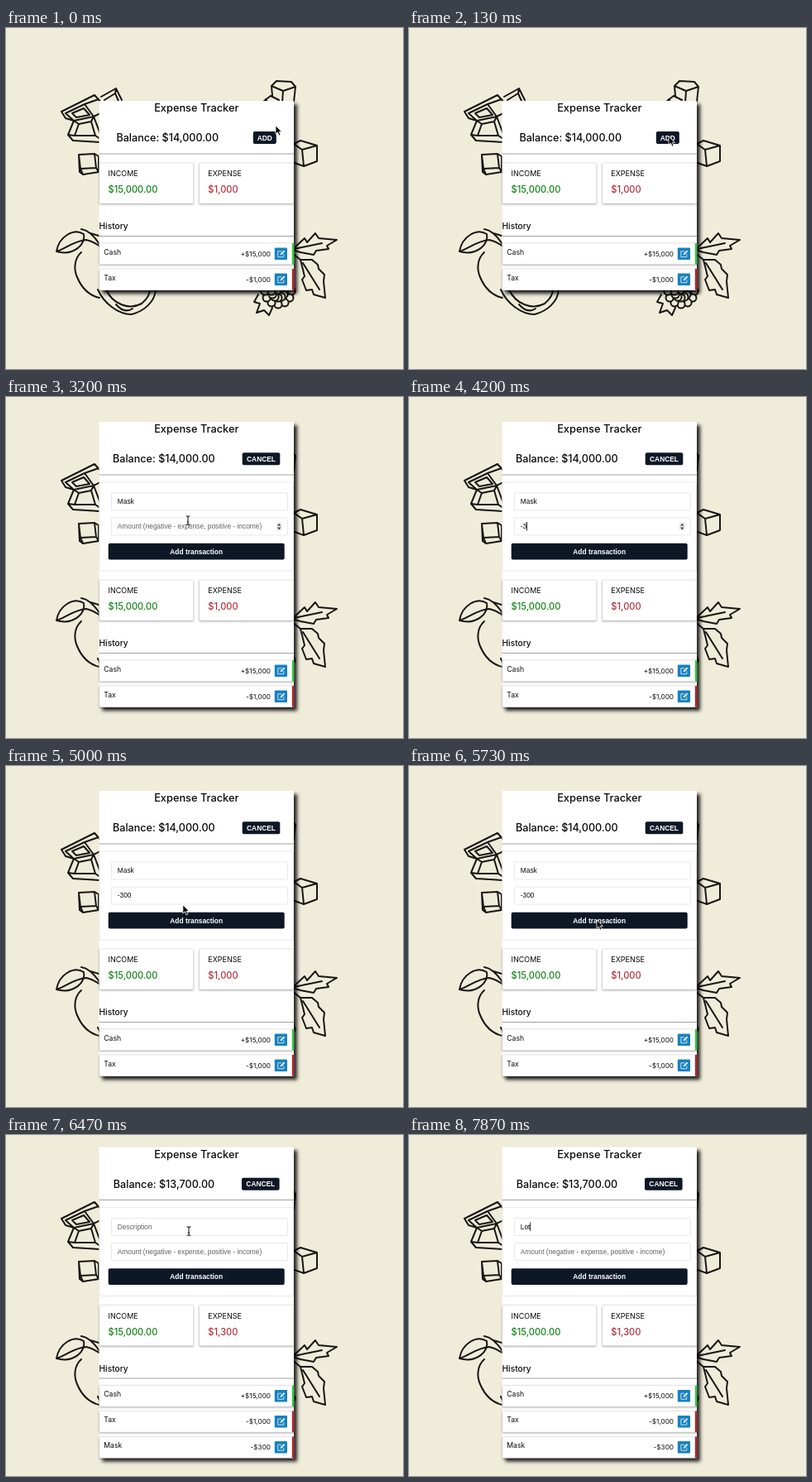
These frames come from a looping animation (480 by 412 pixels, 8 s). An HTML page:

```html
<!DOCTYPE html>
<html lang="en">
<head>
<meta charset="utf-8">
<title>Expense Tracker</title>
<style>
  html, body { margin: 0; width: 100%; height: 100%; overflow: hidden; background: #f0ecda; }
  svg { display: block; width: 480px; height: 412px; }
  text { font-family: Inter, "Open Sans", sans-serif; fill: #0a0a0a; white-space: pre; }
  .form { font-family: "Liberation Sans", Arial, sans-serif; font-size: 8.35px; }
  .hint { fill: #626262; }
  .bold { font-weight: 700; font-size: 8.4px; fill: #fff; text-anchor: middle; }
  .doodle { fill: none; stroke: #171614; stroke-width: 2; stroke-linecap: round; stroke-linejoin: round; }
  .card { fill: #fff; filter: drop-shadow(4.6px 4.6px 1.9px rgba(0, 0, 0, .85)); }
  .panel { fill: #fff; stroke: #d4d4d4; stroke-width: .5; filter: drop-shadow(0 1px .8px rgba(0, 0, 0, .32)); }
  .box { fill: #fff; stroke: #e4e4e6; stroke-width: .8; }
  .rule { stroke: #a2a2a2; stroke-width: 1.1; }
  .dark { fill: #0d1726; }
</style>
</head>
<body>
<svg viewBox="0 0 480 412">
  <rect width="480" height="412" fill="#f0ecda"/>
  <g class="doodle">
    <!-- chocolate -->
    <path d="M67 101L93 88 107 81 115 90M67 101L72 109 82 112M72 103L95 92 106 107 82 112ZM80 103L94 97 101 105 85 108Z
      M82 112L106 107 114 128M82 112L75 129 81 136 114 138M88 116L103 113 108 130 83 130ZM82 112L88 116M106 107L103 113
      M75 129L83 130M108 130L114 134M95 92L112 86M106 107L114 103
      M115 83L133 73 140 87M119 87L132 79 136 88M133 73L132 79"/>
    <path d="M88 153L107 152 109 169 90 170ZM107 152L112 155 112 174 93 177 89 174 88 153M109 169L112 174M90 170L93 177"/>
    <!-- sugar cubes -->
    <path d="M321 70L327 64 345 65 350 71 335 76ZM335 76L334 90M350 71L348 89M321 70L322 82M312 88L320 82 330 87M314 86L318 92
      M348 140L356 136 376 142 376 161 360 167 349 163M348 140L358 147 376 142M358 147L360 167"/>
    <!-- mango -->
    <path d="M61 270C64 252 82 241 94 249C97 260 83 276 61 270M61 270C72 267 82 257 97 256C103 257 108 260 114 264
      M91 243C99 244 107 252 113 261M102 248L112 251
      M91 271C82 279 82 292 86 301C91 313 100 323 113 326M111 316C118 332 135 346 152 346C167 342 180 331 181 316
      M121 316C129 334 149 341 164 333C171 327 174 321 174 316M133 334C140 342 147 343 153 339"/>
    <!-- berry -->
    <path d="M346 268L361 254 364 259 374 248 378 254 400 256 388 263 390 267 375 269 372 274 356 271ZM348 267L382 260
      M356 280L370 280 377 286 378 291 385 298 384 306 386 326 372 322 370 316 363 317 358 304 361 300ZM359 284L379 316
      M346 272L356 280M305 322L300 331 307 333 303 344 312 341 318 347 322 338"/>
    <g id="bumps" fill="#f0ecda"></g>
  </g>
  <g id="app"></g>
  <g id="pointer"></g>
</svg>
<script>
const LOOP = 8000, TICK = 1000 / 15;
const byId = id => document.getElementById(id);

// time, description, amount, field holding the caret (-1: none)
const typing = [
  [0, '', '', -1], [1530, '', '', 0], [1930, '', '', -1],
  [2070, 'M', '', 0], [2470, 'Ma', '', 0], [2530, 'Mas', '', 0], [2670, 'Mask', '', 0],
  [3070, 'Mask', '', -1], [3470, 'Mask', '', 1],
  [3930, 'Mask', '-', 1], [4200, 'Mask', '-3', 1], [4330, 'Mask', '-30', 1], [4470, 'Mask', '-300', 1],
  [4870, 'Mask', '-300', -1], [5800, '', '', -1], [6730, '', '', 0],
  [7200, 'L', '', 0], [7530, 'Lo', '', 0], [7870, 'Lot', '', 0]
];

// time, x, y
const path = [
  [0, 326, 118], [133, 314, 131], [1520, 314, 131], [1530, 269, 125],
  [3000, 269, 125], [3200, 220, 149], [3467, 206, 157],
  [4800, 206, 157], [5333, 227, 186], [6000, 227, 186],
  [6467, 221, 116], [6733, 213, 111], [LOOP, 213, 111]
];
const hidden = [[2070, 3070], [3930, 4870], [7200, LOOP]];

const pen = document.createElement('canvas').getContext('2d');
pen.font = '8.35px "Liberation Sans", Arial, sans-serif';

const text = (x, y, size, s, extra = '') =>
  `<text x="${x}" y="${y}" font-size="${size}" ${extra}>${s}</text>`;
const rect = (x, y, w, h, cls, r = 1) =>
  `<rect x="${x}" y="${y}" width="${w}" height="${h}" rx="${r}" class="${cls}"/>`;
const rule = y => `<path class="rule" d="M112.5 ${y}H348"/>`;
const shift = (y, s) => `<g transform="translate(0 ${y})">${s}</g>`;
const button = (x, y, w, h, s) =>
  rect(x, y, w, h, 'dark', 2) + `<text class="form bold" x="${x + w / 2}" y="${y + h / 2 + 3}">${s}</text>`;

function field(y, value, hint, caret) {
  const x = 134.8 + pen.measureText(value).width;
  return rect(127.5, y, 213, 21, 'box') +
    `<text class="form ${value ? '' : 'hint'}" x="134.8" y="${y + 13.4}">${value || hint}</text>` +
    (caret ? `<path d="M${x + .3} ${y + 5}v10.5" stroke="#111" stroke-width=".9"/>` : '');
}

const spinner = `<rect x="326.5" y="121.5" width="7.5" height="10" rx="1.5" fill="#ececec"/>
  <path d="M328 125.6l2.2-2.8 2.2 2.8zM328 127.6l2.2 2.8 2.2-2.8z" fill="#444"/>`;

function stat(x, w, label, sum, color) {
  return rect(x, 75, w, 49, 'panel') + text(x + 10.5, 91.4, 9, label) +
    text(x + 10.5, 111.4, 11.1, sum, `style="fill:${color}" font-weight="500"`);
}

function row(i, name, sum) {
  const color = sum[0] === '+' ? '#2fc93f' : '#b3222b';
  return shift(172 + 31 * i, rect(113, 0, 235, 25.6, 'panel') +
    `<path d="M347 0v25.6" stroke="${color}" stroke-width="2.4"/>` +
    text(118.2, 13.8, 8.7, name) + text(320, 15.8, 8.2, sum, 'text-anchor="end"') +
    `<rect x="324.8" y="5.4" width="15.2" height="14.6" rx="1" fill="#1882bf"/>
     <path d="M333 9.7h-4.2v7h7v-3.4" fill="none" stroke="#d8ebf6" stroke-width=".9"/>
     <path d="M331.6 14.2l.3-1.8 3.9-3.9 1.5 1.5-3.9 3.9z" fill="#d8ebf6"/>`);
}

function pointAt(t) {
  const q = Math.floor((t + 4) / TICK) * TICK;
  const now = t >= 1530 && q < 1530 ? 1530 : q;
  const i = Math.max(1, path.findIndex(p => p[0] >= now));
  const [a, b] = [path[i - 1], path[i]];
  const k = (now - a[0]) / (b[0] - a[0]);
  return [a[1] + (b[1] - a[1]) * k, a[2] + (b[2] - a[2]) * k];
}

function app(open, added, entry, hover) {
  const [, desc, amount, caret] = entry;
  const top = added ? 14.5 : open ? 30 : 88;
  const extra = open ? 116 : 0;
  const rows = [['Cash', '+$15,000'], ['Tax', '-$1,000']];
  if (added) rows.push(['Mask', '-$300']);

  const head = text(230.3, 13, 12.8, 'Expense Tracker', 'text-anchor="middle" font-weight="500"') +
    text(added ? 129.8 : open ? 129 : 133.4, 49.4, 12.6, added ? 'Balance: $13,700.00' : 'Balance: $14,000.00', 'font-weight="500"') +
    (open ? button(added ? 285 : 285.7, 37.3, 45.6, 15, 'CANCEL') : button(298.8, 37, 28, 15, 'ADD')) +
    rule(64);
  const form = !open ? '' : rect(113, 73, 234.5, 107, 'box') +
    field(86, desc, 'Description', caret === 0) +
    field(116, amount, 'Amount (negative - expense, positive - income)', caret === 1) +
    (hover === 1 ? spinner : '') +
    button(123.7, 146.8, 213, 19.8, 'Add transaction');
  const body = stat(113, 113.6, 'INCOME', '$15,000.00', '#17851b') +
    stat(233.8, 114, 'EXPENSE', added ? '$1,300' : '$1,000', '#b5303a') +
    text(112.5, 155, 10.2, 'History', 'font-weight="500"') + rule(163.5) +
    rows.map((r, i) => row(i, ...r)).join('');

  return shift(top, rect(112.5, 0, 235.5, 167 + 31 * rows.length + extra, 'card', 0) +
    head + form + shift(extra, body));
}

const arrow = '<path d="M0 0V10.2L2.4 8 4.2 12 6 11.2 4.3 7.4H7.4Z" fill="#000" stroke="#fff" stroke-width=".8"/>';
const beam = '<path d="M-2.4-5.2Q0-5.2 0-3.6Q0-5.2 2.4-5.2M0-3.6V3.8M-2.4 5.4Q0 5.4 0 3.8Q0 5.4 2.4 5.4M-1.3 2H1.3" fill="none" stroke="#222" stroke-width="1.1"/>';

let last = '';
function draw(t) {
  const open = t >= 1530, added = t >= 5800;
  const entry = typing.filter(e => e[0] <= t).pop();
  const [x, y] = pointAt(t);
  const rel = y - (added ? 14.5 : 30);
  const hover = !open ? -1 : rel >= 86 && rel <= 107 ? 0 : rel >= 116 && rel <= 137 ? 1 : -1;

  const view = app(open, added, entry, hover);
  if (view !== last) byId('app').innerHTML = last = view;

  const shown = !hidden.some(([a, b]) => t >= a && t < b);
  byId('pointer').innerHTML = shown
    ? `<g transform="translate(${x} ${y})">${hover < 0 ? arrow : beam}</g>` : '';
}

// bumps of the berry, in two rings
let bumps = '';
for (const r of [16, 8]) {
  for (let i = 0; i < 7; i++) {
    const a = Math.PI * i / 6;
    bumps += `<circle cx="${329 + r * Math.cos(a)}" cy="${318 + r * Math.sin(a)}" r="4.6"/>`;
  }
}
byId('bumps').innerHTML = bumps;

const start = performance.now();
function frame() {
  draw((performance.now() - start) % LOOP);
  requestAnimationFrame(frame);
}
frame();
</script>
</body>
</html>
```
